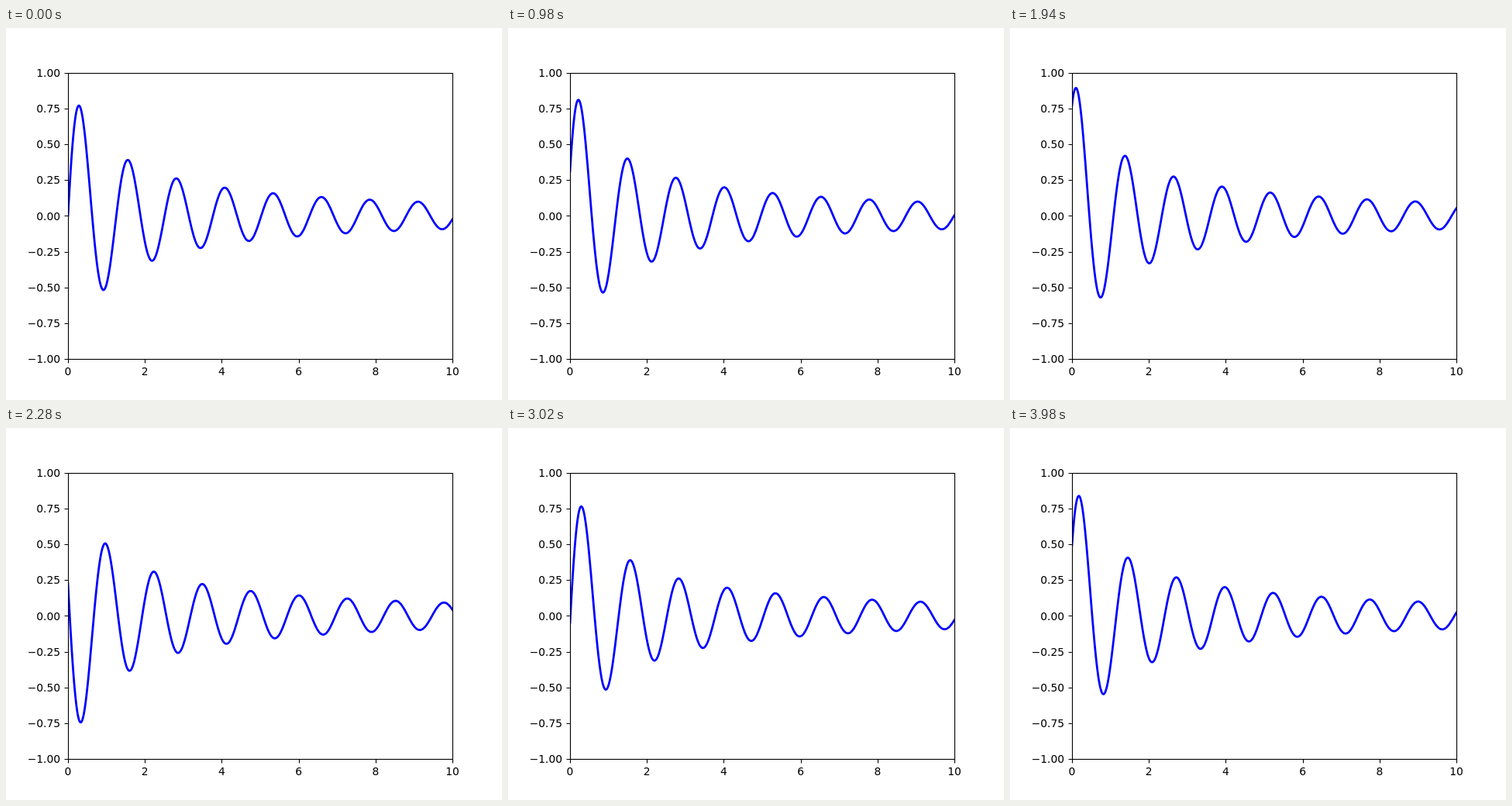
These frames come from a looping animation (640 px wide and 480 px high, 4000 ms). An HTML page:

```html
<!DOCTYPE html>
<html lang="en">
<head>
<meta charset="utf-8">
<title>Damped travelling wave</title>
<style>
  html, body { margin: 0; width: 100%; height: 100%; overflow: hidden; background: #fff; }
  svg { display: block; width: 640px; height: 480px; }
  text { font: 13.89px "DejaVu Sans", sans-serif; fill: #000; }
  .axis { fill: none; stroke: #000; stroke-width: 1.11; }
  #wave { fill: none; stroke: #00f; stroke-width: 2.78; stroke-linejoin: round; stroke-linecap: square; }
</style>
</head>
<body>
<svg viewBox="0 0 640 480">
  <clipPath id="plot"><rect x="80" y="58" width="496" height="369"/></clipPath>
  <g clip-path="url(#plot)"><path id="wave"/></g>
  <path id="ticks" class="axis"/>
  <rect class="axis" x="80.5" y="58.5" width="496" height="369"/>
  <g id="xLabels" text-anchor="middle"></g>
  <g id="yLabels" text-anchor="end"></g>
</svg>
<script>
const LOOP = 4000, STEP = 20, PHASE_STEP = 0.25, POINTS = 1000;
const get = id => document.getElementById(id);
const toX = x => 80 + 49.6 * x;
const toY = y => 242.4 - 184.8 * y;
const snap = v => Math.floor(v + 0.5) + 0.5;

function addLabel(group, text, x, y) {
  const label = document.createElementNS("http://www.w3.org/2000/svg", "text");
  label.setAttribute("x", x);
  label.setAttribute("y", y);
  label.textContent = text;
  group.append(label);
}

function drawAxes() {
  let ticks = "";
  for (let x = 0; x <= 10; x += 2) {
    ticks += `M${snap(toX(x))} 427.5v5`;
    addLabel(get("xLabels"), x, toX(x), 448);
  }
  for (let y = -1; y <= 1; y += 0.25) {
    ticks += `M80.5 ${snap(toY(y))}h-5`;
    addLabel(get("yLabels"), y.toFixed(2).replace("-", "\u2212"), 70.2, Math.round(toY(y) + 5.28));
  }
  get("ticks").setAttribute("d", ticks);
}

function drawWave(phase) {
  const points = [];
  for (let i = 0; i < POINTS; i++) {
    const x = 10 * i / (POINTS - 1);
    const y = Math.sin(5 * x - phase) / (1 + x);
    points.push(toX(x).toFixed(2) + " " + toY(y).toFixed(2));
  }
  get("wave").setAttribute("d", "M" + points.join("L"));
}

let start, shown = -1;
function tick(now) {
  start ??= now;
  const step = Math.floor(((now - start) % LOOP) / STEP);
  if (step !== shown) {
    drawWave(step * PHASE_STEP);
    shown = step;
  }
  requestAnimationFrame(tick);
}

drawAxes();
drawWave(0);
requestAnimationFrame(tick);
</script>
</body>
</html>
```
